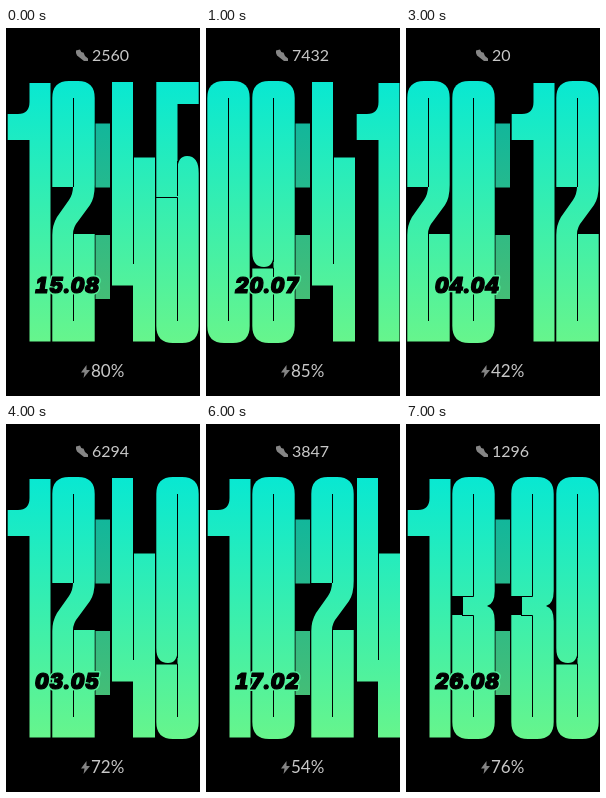
Write an HTML page with a canvas that moves like this. It is 194 px wide and 368 px high and loops after 8000 ms.

```html
<!DOCTYPE html>
<html lang="en">
<head>
<meta charset="utf-8">
<title>Watch face</title>
<style>
html, body { margin: 0; width: 100%; height: 100%; overflow: hidden; background: #000; }
canvas, svg { position: absolute; left: 0; top: 0; display: block; }
text {
  font: italic 900 21px Inter, sans-serif;
  font-variant-numeric: tabular-nums;
  letter-spacing: 1px;
  stroke-linejoin: round;
}
.halo { fill: none; stroke: url(#tint); stroke-width: 4px; }
.ink { fill: #000; stroke: #000; stroke-width: 1.2px; }
</style>
</head>
<body>
<canvas id="face" width="194" height="368"></canvas>
<svg width="194" height="368">
  <linearGradient id="tint" gradientUnits="userSpaceOnUse" x1="0" y1="53" x2="0" y2="315">
    <stop offset="0" stop-color="#08e8d2"/>
    <stop offset="1" stop-color="#67f58c"/>
  </linearGradient>
  <text class="halo" x="29" y="265"></text>
  <text class="ink" x="29" y="265"></text>
</svg>
<script>
const ctx = document.getElementById('face').getContext('2d');
const dateTexts = document.querySelectorAll('text');

// Each digit: its solid outline and the hairlines cut into it, in cell coordinates.
const digits = {
  0: ['M.3 70Q.3 53 17 53H26Q42.7 53 42.7 70V298Q42.7 315 26 315H17Q.3 315 .3 298Z',
      'M21.5 70V293'],
  1: ['M.7 86H11Q22.5 86 22.5 74V55H43.5V313.5H22.5V112H.7Z', ''],
  2: ['M.3 159V70Q.3 53 17 53H26Q42.7 53 42.7 70V157Q42.7 170 38 177L27 192Q21 199 21 206H42.7V313.5H.3V207Q.3 197 5 189L17 172Q21 166 21 159Z',
      'M21.5 70V159M21.5 206V293'],
  3: ['M.3 172V70Q.3 53 17 53H26Q42.7 53 42.7 70V167Q42.7 180 35 182Q42.7 184 42.7 197V298Q42.7 315 26 315H17Q.3 315 .3 298V191H11V172Z',
      'M21.5 70V172.5H10M10 191.5H21.5V293'],
  4: ['M1 54H22V129.5H44V313.5H22V257.5H1Z',
      'M22.5 129V236'],
  5: ['M.3 54H42.7V76H21.5V142Q21.5 128 31 128Q42.7 128 42.7 145V298Q42.7 315 26 315H17Q.3 315 .3 298Z',
      'M21.5 133V168M0 169.5H21.5V293'],
  7: ['M2 55H41.5V76L24.5 313.5H1.5L19.7 75.5H2Z', ''],
  9: ['M.3 70Q.3 53 17 53H26Q42.7 53 42.7 70V298Q42.7 315 26 315H17Q.3 315 .3 298V240H21.5V226Q21.5 239 12 239Q.3 239 .3 224Z',
      'M21.5 70V234M0 240H21.5V293']
};
for (const key in digits) digits[key] = digits[key].map(d => new Path2D(d));

const cells = [1, 46, 105, 150];
const states = [
  ['1245', '15.08', 2560, 80],
  ['0941', '20.07', 7432, 85],
  ['1732', '06.03', 5221, 63],
  ['2012', '04.04', 20, 42],
  ['1249', '03.05', 6294, 72],
  ['2325', '22.06', 10913, 90],
  ['1024', '17.02', 3847, 54],
  ['1339', '26.08', 1296, 76]
];

const gradient = ctx.createLinearGradient(0, 53, 0, 315);
gradient.addColorStop(0, '#08e8d2');
gradient.addColorStop(1, '#67f58c');

const shoe = new Path2D('M70 22.5L74 21.5Q75 25 77.5 24.5L79 28L82 30.5V33H78L71 27.5Q69.5 25 70 22.5Z');
const bolt = new Path2D('M80.5 337L75 344.5H78.5L77.5 350L84 342H80.5Z');

function drawDigit(key, x) {
  const [shape, cuts] = digits[key];
  ctx.save();
  ctx.translate(x, 0);
  ctx.fillStyle = gradient;
  ctx.fill(shape);
  ctx.strokeStyle = '#000';
  ctx.lineWidth = 1;
  ctx.stroke(cuts);
  ctx.restore();
}

function drawColon() {
  ctx.globalAlpha = 0.78;
  ctx.fillStyle = gradient;
  for (const y of [95.5, 207]) ctx.fillRect(89.5, y, 14.5, 64);
  ctx.globalAlpha = 1;
}

function drawStats(steps, charge) {
  ctx.fillStyle = '#858585';
  ctx.fill(shoe);
  ctx.fill(bolt);
  ctx.fillStyle = '#c8c8c8';
  ctx.font = '16px Lato, sans-serif';
  ctx.fillText(steps, 86, 33);
  ctx.font = '17px Lato, sans-serif';
  ctx.fillText(charge + '%', 85, 349);
}

function draw(now) {
  const index = Math.floor(now / 1000) % states.length;
  const [time, date, steps, charge] = states[index];
  ctx.fillStyle = '#000';
  ctx.fillRect(0, 0, 194, 368);
  drawColon();
  cells.forEach((x, i) => drawDigit(time[i], x));
  for (const text of dateTexts) text.textContent = date;
  drawStats(steps, charge);
}

let start;
function tick(now) {
  start ??= now;
  draw(now - start);
  requestAnimationFrame(tick);
}
draw(0);
requestAnimationFrame(tick);
</script>
</body>
</html>
```
